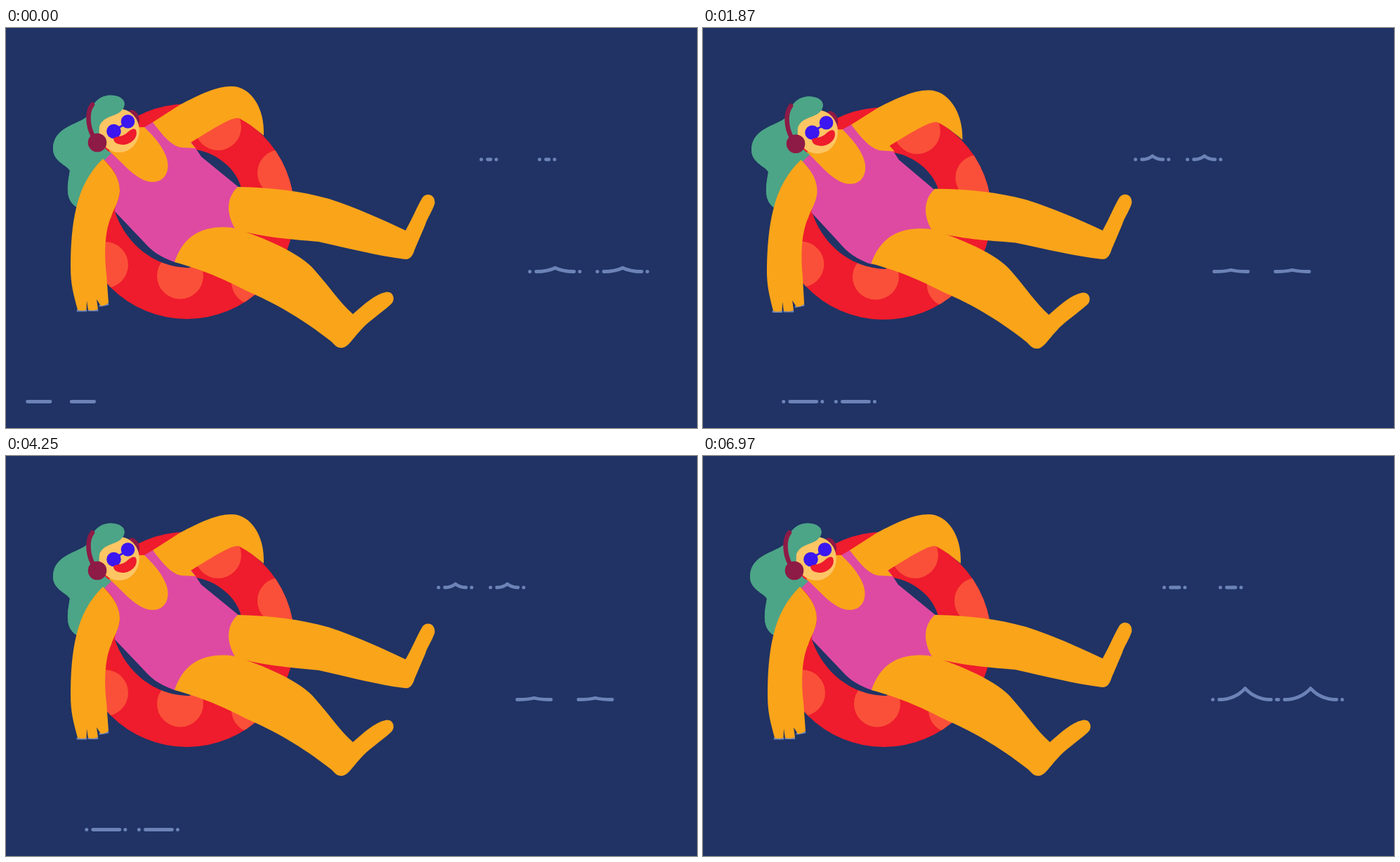
Write an HTML page with a canvas that moves like this. It is 984 px wide and 569 px high and loops after 7140 ms.

```html
<!DOCTYPE html>
<html lang="en">
<head>
<meta charset="utf-8">
<title>Floating</title>
<style>
html, body { margin: 0; width: 100%; height: 100%; overflow: hidden; background: #203364; }
canvas { display: block; }
</style>
</head>
<body>
<canvas id="stage" width="984" height="569"></canvas>
<script>
const ctx = document.getElementById('stage').getContext('2d');
const STEP = 170, LOOP = 7140, BOB = 1400, FIRST_DIP = 2720, SWELL = 7;
const TAU = Math.PI * 2, RAD = Math.PI / 180;
const C = {
  sea: '#203364', skin: '#faa41a', face: '#fdc564', suit: '#de4aa2', hair: '#4ca587',
  ring: '#ee1c2c', spot: '#fa5039', wine: '#8e1a46', lens: '#3b16f0', foam: '#6c83b7'
};

// x, gap, w and h hold at the crest; peak and rise count steps of the swell
const WAVES = [
  { x: 90, y: 531.5, gap: 68, w: 38, h: 22, speed: 24, peak: 1.8, rise: 3 },
  { x: 608, y: 187, gap: 68, w: 19, h: 10, speed: 16, peak: 2, rise: 1 },
  { x: 768, y: 346.5, gap: 92, w: 38, h: 17, speed: 10, peak: 5.6, rise: 3.5 }
];

// Middle and half length in degrees
const RIPPLES = [
  { r: 157, arcs: [[59, 7], [101, 33], [252, 8], [268, 5], [326, 9]] },
  { r: 166, arcs: [[18, 4], [89, 20], [128, 3], [181, 6]] }
];

const HOLE = 'M271 173C300 178 328 200 335 228L262 341C205 341 168 300 155 261Z';
const SUIT = 'M197 141L209 134L235 140L262 160L270 171L278 183L332 227L335 280L300 330L250 334L240 333C215 324 205 314 196 304L155 261C155 250 162 245 162 230C160 208 148 195 138 186L147 176Z';
const CHEST = 'M147 175C165 190 186 219 209 219C229 219 236 198 226 178C219 163 208 152 197 141L160 142Z';
const RAISED = 'M209 134L248 109C275 95 300 83 320 83C347 82 369 112 367 153C355 143 345 135 333 129C326 124 300 140 263 163L270 171L250 170C236 168 224 154 209 134Z';
const FAR_LEG = 'M330 226C380 227 420 232 460 243C500 256 535 272 569 288C580 268 585 255 592 243C597 233 612 236 610.5 250C606 263 600 270 597 280L582 315C578 328 573 330 565 328.5C530 324 490 314 445 304C400 300 370 298 327 287C312 262 315 240 330 226Z';
const NEAR_LEG = 'M240 333C253 295 280 280 322 284C365 297 420 320 440 345C462 370 475 390 494 407C510 393 525 379 540 376C552 373 556 388 547 394C535 405 515 418 505 430C495 440 487 455 478 455C470 455 468 450 462 445C420 412 380 390 345 375C315 360 290 347 240 333Z';
const HAIR = 'M153 96C170 98 173 110 163 119C152 127 138 126 133 140C131 160 138 172 150 178L138 190L101 255C84 245 87 225 91 203C86 194 66 190 67 170C69 140 102 138 117 125C124 102 138 94 153 96Z';
const MOUTH = 'M153 158C153 154 162 155 168 152C174 149 180 140 185 145C189 156 178 165 168 166C160 166 154 164 153 158Z';
const SPLASH = 'M102 411Q106 418 113 417M118 412Q126 416 134 411Q138 418 142 409Q152 406 155 400M150 413L157 409M156 393L155 401L160 402';
const EDDY = 'M94 406Q104 416 114 409Q124 414 134 408Q144 408 150 399M97 396L100 402';

const clamp = v => Math.max(0, Math.min(1, v));

function fill(d, color) {
  ctx.fillStyle = color;
  ctx.fill(new Path2D(d));
}

function stroke(d, color, width, dash = []) {
  ctx.strokeStyle = color;
  ctx.lineWidth = width;
  ctx.setLineDash(dash);
  ctx.stroke(new Path2D(d));
  ctx.setLineDash([]);
}

function oval(x, y, rx, ry, color, turn = 0) {
  ctx.fillStyle = color;
  ctx.beginPath();
  ctx.ellipse(x, y, rx, ry, turn, 0, TAU);
  ctx.fill();
}

function dot(x, y, r, color) { oval(x, y, r, r, color); }

// Draws under a small skew, stretch and shift
function posed(xy, yx, yy, dx, dy, draw) {
  ctx.save();
  ctx.transform(1, yx, xy, 1 + yy, dx, dy);
  draw();
  ctx.restore();
}

// Each pair of crests grows out of dashes, drifts right and breaks up again
function drawWave({ x, y, gap, w, h, speed, peak, rise }, n) {
  let age = (n - peak + 2 * SWELL) % SWELL;
  if (age > SWELL - rise) age -= SWELL;
  const fading = age > 0;
  const swell = Math.cos(Math.PI * age / (fading ? SWELL - rise : rise));
  if (swell < -.9) return;
  const half = w * ((1 + swell) / 2) ** .8, top = y - h * Math.max(0, swell);
  for (const i of [0, 1]) {
    const p = x + speed * age + i * (gap + 3 * age), a = p - half, b = p + half;
    stroke(`M${a} ${y}C${p - half * .5} ${y} ${p - half * .2} ${(y + top) / 2} ${p} ${top}` +
      `C${p + half * .2} ${(y + top) / 2} ${p + half * .5} ${y} ${b} ${y}`, C.foam, 4.8);
    if (fading && swell < .99) {
      dot(a - 9, y, 2.5, C.foam);
      dot(b + 8, y, 2.5, C.foam);
    }
  }
}

function drawRipples(age) {
  const size = Math.min(1, (age - 100) / 250, (690 - age) / 90);
  if (size <= 0) return;
  ctx.strokeStyle = C.foam;
  ctx.lineWidth = 2.8;
  for (const { r, arcs } of RIPPLES) {
    for (const [mid, half] of arcs) {
      const left = half - 32 * (1 - size);
      if (left <= 0) continue;
      ctx.beginPath();
      ctx.arc(254, 263, r + (age - 600) * .03, (mid - left) * RAD, (mid + left) * RAD);
      ctx.stroke();
    }
  }
  stroke(EDDY, C.foam, 2.6, [4 * size, 6]);
}

function drawRing() {
  ctx.save();
  ctx.beginPath();
  ctx.arc(257.5, 261, 153, 0, TAU);
  ctx.clip();
  ctx.fillStyle = C.ring;
  ctx.fillRect(100, 100, 320, 320);
  for (const [x, y] of [[302, 141], [391, 206], [141, 337], [248, 352.5], [354, 361]]) dot(x, y, 33, C.spot);
  ctx.restore();
  fill(HOLE, C.sea);
}

function drawHangingArm(dip) {
  const at = (x, y) => `${x + 4 * dip} ${y + 9 * dip}`;
  stroke(`M${at(102, 402)}L${at(114, 402)}M${at(118, 401.5)}L${at(130, 401.5)}M${at(134, 395)}L${at(145, 393)}`, C.foam, 3);
  fill('M138 186C150 198 162 212 162 232C160 250 154 255 150 268C142 285 139 315 143 350' +
    `L${at(146, 391)}Q${at(142, 395)} ${at(135, 395)}L${at(129, 386)}L${at(131, 400)}` +
    `Q${at(125, 403)} ${at(117, 401)}L${at(115, 388)}L${at(114.5, 401)}Q${at(108, 403)} ${at(102, 401)}` +
    'C96 378 92 365 92 340C92 310 94 280 100 256C106 228 120 203 138 186Z', C.skin);
}

function drawHead() {
  oval(181.5, 128, 8, 12, C.wine, -.4);
  oval(161, 146, 29, 31, C.face);
  fill(HAIR, C.hair);
  stroke('M123 109C115 119 116 139 124 154', C.wine, 6.5);
  dot(130, 163, 13.3, C.wine);
  stroke('M160 142L169 137', C.lens, 3);
  dot(153.5, 147, 10.3, C.lens);
  dot(173.5, 133, 9.8, C.lens);
  fill(MOUTH, C.ring);
}

function draw(n) {
  const t = n * STEP;
  const k = clamp(.5 - .56 * Math.cos(TAU * (t / BOB - .03)));
  const foot = 4 * (1 - t / LOOP) * Math.sin(2 * TAU * t / LOOP);
  const lift = (foot - 4 * k) / 270;

  // The hand dips on every second bob and sets off the ripples
  const beat = t - FIRST_DIP;
  const near = Math.abs(beat - 2 * BOB * Math.max(0, Math.round(beat / (2 * BOB))));
  const dip = Math.cos(Math.min(1, near / 340) * Math.PI / 2) ** 2;

  ctx.lineCap = ctx.lineJoin = 'round';
  ctx.fillStyle = C.sea;
  ctx.fillRect(0, 0, 984, 569);
  for (const wave of WAVES) drawWave(wave, n);
  if (beat >= 0) drawRipples(beat % (2 * BOB));

  posed(-.034 * k, .034 * k, -.02 * k, 9.1 * k, .7 * k, drawRing);
  posed(0, 0, 0, 3 * k, 2.5 * k, () => fill(HAIR, C.hair));
  posed(-.027 * k, .03 * k, -.012 * k, 6.3 * k, .5 * k, () => {
    fill(SUIT, C.suit);
    fill(CHEST, C.skin);
  });
  posed(.03 * k, .025 * k, 0, -k, -.2 * k, () => fill(RAISED, C.skin));
  posed(0, lift, 0, 0, 4 * k - 330 * lift, () => fill(FAR_LEG, C.skin));
  posed(-.017 * k, -.006 * k, 0, 4.8 * k, 4.4 * k, () => fill(NEAR_LEG, C.skin));
  posed(0, 0, 0, 3 * k, 2.5 * k, drawHead);
  posed(-.023 * k, 0, 0, 6.3 * k, 2 * k, () => drawHangingArm(dip));
  if (dip > .5) stroke(SPLASH, C.foam, 3, [1, 4.5]);
}

const start = performance.now();
let shown = -1;
function tick() {
  const n = Math.floor((performance.now() - start) % LOOP / STEP);
  if (n !== shown) draw(shown = n);
  requestAnimationFrame(tick);
}
tick();
</script>
</body>
</html>
```
